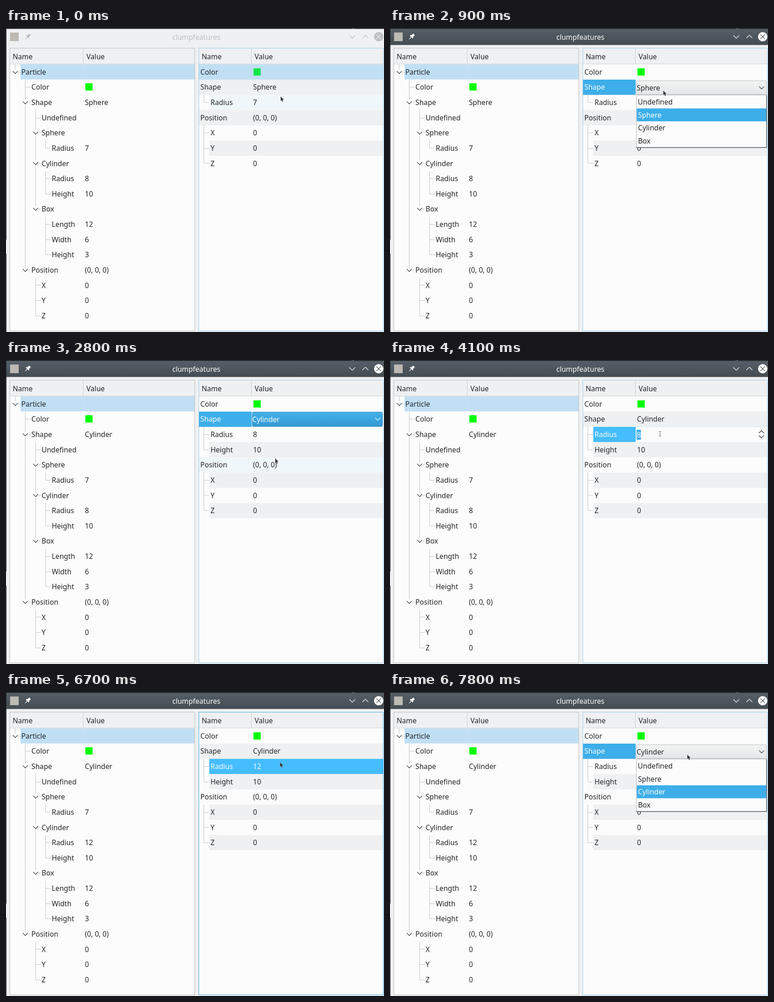
Animation of 834x671 px, one loop 8 s. Source, as an HTML page with a canvas:

```html
<!DOCTYPE html>
<html lang="en">
<head>
<meta charset="utf-8">
<style>
html, body { margin: 0; width: 100%; height: 100%; overflow: hidden; background: #eff0f1; }
canvas { display: block; }
</style>
</head>
<body>
<canvas id="stage" width="834" height="671"></canvas>
<script>
const ctx = document.getElementById('stage').getContext('2d');
const LOOP = 8000, STEP = 100, ROW = 33.63, TOP = 80.3, INDENT = 22.4;
const INK = '#232629', BASE = '#fcfcfc', ALT = '#eff0f1', LINE = '#c0c2c3', BLUE = '#3daee9';
const SHAPES = ['Undefined', 'Sphere', 'Cylinder', 'Box'];
const POINTER = [
  [0, 606, 151], [100, 606, 151], [300, 603, 138], [1300, 603, 138], [1800, 598, 174],
  [2200, 594, 217], [2900, 594, 217], [3200, 483, 183], [3600, 596, 158],
  [6600, 596, 158], [7300, 656, 138], [LOOP, 656, 138]
];

const clamp = v => Math.max(0, Math.min(1, v));
const lerp = (a, b, k) => a + (b - a) * k;
const mix = (a, b, k) => `rgb(${a.map((v, i) => Math.round(lerp(v, b[i], k)))})`;
const centre = i => TOP + ROW * (i + 0.5);

function rect(x, y, w, h, fill) {
  ctx.fillStyle = fill;
  ctx.fillRect(x, y, w, h);
}

function path(points, color, width = 1) {
  ctx.strokeStyle = color;
  ctx.lineWidth = width;
  ctx.beginPath();
  points.forEach(([x, y]) => ctx.lineTo(x, y));
  ctx.stroke();
}

function frame(x, y, w, h, color) {
  ctx.strokeStyle = color;
  ctx.lineWidth = 1;
  ctx.strokeRect(x, y, w, h);
}

function text(value, x, cy, color = INK, align = 'left') {
  ctx.fillStyle = color;
  ctx.textAlign = align;
  ctx.fillText(value, x, cy + 5.7);
}

function chevron(x, y, color = INK, up = false, size = 5.5, width = 1.2) {
  const h = up ? -size / 2 : size / 2;
  path([[x - size, y - h], [x, y + h], [x + size, y - h]], color, width);
}

function gradient(y, h, from, to) {
  const g = ctx.createLinearGradient(0, y, 0, y + h);
  g.addColorStop(0, from);
  g.addColorStop(1, to);
  return g;
}

function pointerAt(t) {
  const i = POINTER.findIndex(p => p[0] > t);
  const [a, b] = [POINTER[i - 1], POINTER[i]];
  const k = (t - a[0]) / (b[0] - a[0]);
  return { x: lerp(a[1], b[1], k), y: lerp(a[2], b[2], k) };
}

function stateAt(t) {
  const within = (a, b) => t >= a && t < b;
  const popup = within(700, 2800) ? clamp((t - 600) / 300)
    : t >= 7600 ? clamp((t - 7500) / 300) : 0;
  const pointer = pointerAt(t);
  const shape = t < 2800 ? 'Sphere' : 'Cylinder';
  const combo = within(500, 3800) || t >= 7500;
  return {
    pointer, shape, popup, combo,
    active: clamp((t - 100) / 400),
    selected: t < 300 ? 0 : t < 3800 || t >= 7500 ? 1 : 2,
    hovered: popup ? -1 : Math.floor((pointer.y - TOP) / ROW),
    choice: popup && pointer.y >= 149 ? Math.floor((pointer.y - 149) / 28.6) : SHAPES.indexOf(shape),
    comboFocus: within(2800, 3800),
    spin: within(4000, 6000),
    typed: t < 4400 ? '8' : t < 5500 ? '1' : '12',
    typedSelected: t < 4400,
    caret: within(4400, 4600) || within(5100, 5500) || t >= 5600,
    radius: t < 6000 ? '8' : '12',
    focus: t < 6000 ? 0 : t < 7500 ? clamp((t - 5900) / 200) : clamp((7800 - t) / 400)
  };
}

// Rows: depth, name, value, expandable
const position = depth => [
  [depth, 'Position', '(0, 0, 0)', depth > 0],
  ...['X', 'Y', 'Z'].map(axis => [depth + 1, axis, '0'])
];

const treeRows = s => [
  [0, 'Particle', '', true],
  [1, 'Color', 'swatch'],
  [1, 'Shape', s.shape, true],
  [2, 'Undefined', ''],
  [2, 'Sphere', '', true], [3, 'Radius', '7'],
  [2, 'Cylinder', '', true], [3, 'Radius', s.radius], [3, 'Height', '10'],
  [2, 'Box', '', true], [3, 'Length', '12'], [3, 'Width', '6'], [3, 'Height', '3'],
  ...position(1)
];

const formRows = s => [
  [0, 'Color', 'swatch'],
  [0, 'Shape', s.shape],
  ...(s.shape === 'Sphere' ? [[1, 'Radius', '7']] : [[1, 'Radius', s.radius], [1, 'Height', '10']]),
  ...position(0)
];

function drawPanel(x, w, column, border) {
  rect(x, 44.5, w, 624, BASE);
  rect(x, 45, w, 35, ALT);
  path([[x, 79.5], [x + w, 79.5]], '#cfd1d2');
  path([[column, 45], [column, 80]], '#cbcdce');
  text('Name', x + 6.2, 63);
  text('Value', column + 7, 63);
  frame(x, 44.5, w, 624, border);
}

function drawBranches(rows, x0, minDepth) {
  rows.forEach(([depth, , , open], i) => {
    if (depth < minDepth) return;
    const x = Math.floor(x0 + INDENT * depth) + 0.5;
    const cy = Math.floor(centre(i)) + 0.5;
    let p = i - 1;
    while (p >= 0 && rows[p][0] > depth) p--;
    const start = p < 0 ? 80 : rows[p][0] < depth ? centre(p) + ROW / 2
      : centre(p) + (rows[p][3] ? 6 : 0);
    const gap = open ? 6 : 0;
    path([[x, start], [x, cy - gap]], LINE);
    path([[x + gap, cy], [x + 11.5, cy]], LINE);
    if (open) chevron(x, cy + 0.3);
  });
}

function drawCells(rows, nameX, valueX, swatchX, swatch, selected = -1) {
  rows.forEach(([depth, name, value], i) => {
    const cy = centre(i), color = i === selected ? '#fcfcfc' : INK;
    text(name, nameX + INDENT * depth, cy, color);
    if (value === 'swatch') rect(swatchX, Math.round(cy - 8.4), 16, 16, swatch);
    else text(value, valueX, cy, color);
  });
}

function drawTitle(s) {
  const k = s.active;
  const ink = mix([190, 192, 193], [252, 252, 252], k);
  const top = mix([239, 240, 241], [86, 95, 103], k);
  const bottom = mix([239, 240, 241], [68, 76, 83], k);
  rect(1, 2, 833, 35.5, gradient(2, 35.5, top, bottom));
  rect(0, 0, 834, 2, '#24282b');
  rect(763, 0, 6, 1, '#77797b');
  rect(0, 0, 1, 467, '#24282b');
  rect(0, 498, 1, 173, '#24282b');
  rect(9, 10, 19, 19, '#bdb9b3');

  ctx.save();
  ctx.translate(48, 19);
  ctx.rotate(Math.PI / 4);
  rect(-2.5, -7, 5, 7, ink);
  rect(-4.5, -1, 9, 2.5, ink);
  rect(-0.6, 1, 1.2, 7, ink);
  ctx.restore();

  text('clumpfeatures', 420, 20, ink, 'center');
  chevron(764, 19.5, ink, false, 6.5);
  chevron(793, 19, ink, true, 6.5);
  ctx.fillStyle = ink;
  ctx.beginPath();
  ctx.arc(822.3, 19.3, 10.3, 0, Math.PI * 2);
  ctx.fill();
  path([[817.3, 14.3], [827.3, 24.3]], bottom, 1.2);
  path([[827.3, 14.3], [817.3, 24.3]], bottom, 1.2);
}

function drawTree(s) {
  const rows = treeRows(s);
  drawPanel(8.5, 408, 170.5, '#bbbdbe');
  rect(32, TOP, 384, ROW - 0.4, '#c1dff4');
  path([[170.5, TOP], [170.5, TOP + ROW - 0.4]], '#c8e2f4');
  drawBranches(rows, 20.3, 0);
  drawCells(rows, 33.7, 174, 175, '#0f0');
}

function drawForm(s) {
  const rows = formRows(s), lit = s.active > 0.4;
  drawPanel(425.5, 407, 541.5, mix([147, 207, 236], [61, 174, 233], s.focus));
  rows.forEach(([depth], i) => {
    const x = depth ? 448.5 : 426, y = TOP + ROW * i;
    const fill = color => rect(x, y, 832 - x, ROW, color);
    if (i % 2) fill(ALT);
    if (i === s.selected) fill(!lit ? '#c1dff4' : i === s.hovered ? '#45bdff' : BLUE);
    else if (i === s.hovered) fill(`rgba(61,174,233,${s.focus ? 0.2 : 0.06})`);
  });
  drawBranches(rows, 414.4, 1);
  drawCells(rows, 428.8, 545, 546, lit ? '#0f0' : '#14e64a', lit ? s.selected : -1);
}

function drawCombo(s) {
  const focus = s.comboFocus, y = focus ? 115 : 116.5;
  ctx.fillStyle = focus ? gradient(y, 32, '#42b2ec', '#3498d2') : gradient(y, 31, '#f2f3f3', '#e5e6e7');
  ctx.strokeStyle = focus ? '#2b82b4' : '#b9bbbc';
  ctx.lineWidth = 1;
  rect(542, TOP + ROW, 290, ROW, BASE);
  ctx.fillStyle = focus ? gradient(y, 32, '#42b2ec', '#3498d2') : gradient(y, 31, '#f2f3f3', '#e5e6e7');
  ctx.beginPath();
  ctx.roundRect(543.5, y, 287, 146.5 - y, 2.5);
  ctx.fill();
  ctx.stroke();
  const color = focus ? BASE : INK;
  text(s.shape, focus ? 543.3 : 544.2, focus ? 131 : 131.8, color);
  chevron(820, focus ? 130.5 : 131.8, color);
}

function drawPopup(s) {
  ctx.globalAlpha = s.popup;
  rect(543, 148, 288, 116, BASE);
  SHAPES.forEach((name, i) => {
    const y = 149 + 28.5 * i, chosen = i === s.choice;
    if (chosen) rect(544.5, y, 285.5, 28.5, BLUE);
    text(name, i ? 547.2 : 546.6, y + 14.3, chosen ? BASE : INK);
  });
  path([[543.5, 264], [543.5, 148], [831, 148]], '#b4b6b7');
  path([[543, 263.8], [830.8, 263.8], [830.8, 148]], '#54585b', 1.4);
  ctx.globalAlpha = 1;
}

function drawSpin(s) {
  const cy = centre(2);
  rect(542, cy - ROW / 2, 290, ROW, BASE);
  if (s.typedSelected) rect(544, 154, 9.5, 22, BLUE);
  text(s.typed, 544.4, cy + 0.5, s.typedSelected ? BASE : INK);
  if (s.caret) rect(544.5 + 8.95 * s.typed.length, 154, 1.2, 22, INK);
  chevron(819.5, 158.5, INK, true);
  chevron(819.5, 169.5);
}

function drawPointer({ x, y }, beam) {
  if (beam) {
    path([[x, 158], [x, 168]], '#6a6d70');
    path([[x - 2.5, 157.7], [x + 2.5, 157.7]], '#6a6d70');
    path([[x - 2.5, 168], [x + 2.5, 168]], '#6a6d70');
    return;
  }
  const outline = [[0, 0], [0, 10], [2.3, 8.2], [4, 12], [5.6, 11.2], [4.1, 7.6], [7, 7.4]];
  ctx.beginPath();
  outline.forEach(([dx, dy]) => ctx.lineTo(x + dx, y + dy));
  ctx.closePath();
  ctx.strokeStyle = 'rgba(252,252,252,.6)';
  ctx.lineWidth = 1;
  ctx.stroke();
  ctx.fillStyle = '#31363b';
  ctx.fill();
}

function draw(now) {
  const s = stateAt(Math.floor((now % LOOP) / STEP) * STEP);
  ctx.font = '15.65px "Noto Sans", sans-serif';
  rect(0, 0, 834, 671, ALT);
  drawTitle(s);
  drawTree(s);
  drawForm(s);
  if (s.combo) drawCombo(s);
  if (s.popup) drawPopup(s);
  if (s.spin) drawSpin(s);
  drawPointer(s.pointer, s.spin);
}

let begin;
function tick(now) {
  begin ??= now;
  draw(now - begin);
  requestAnimationFrame(tick);
}
draw(0);
requestAnimationFrame(tick);
</script>
</body>
</html>
```
